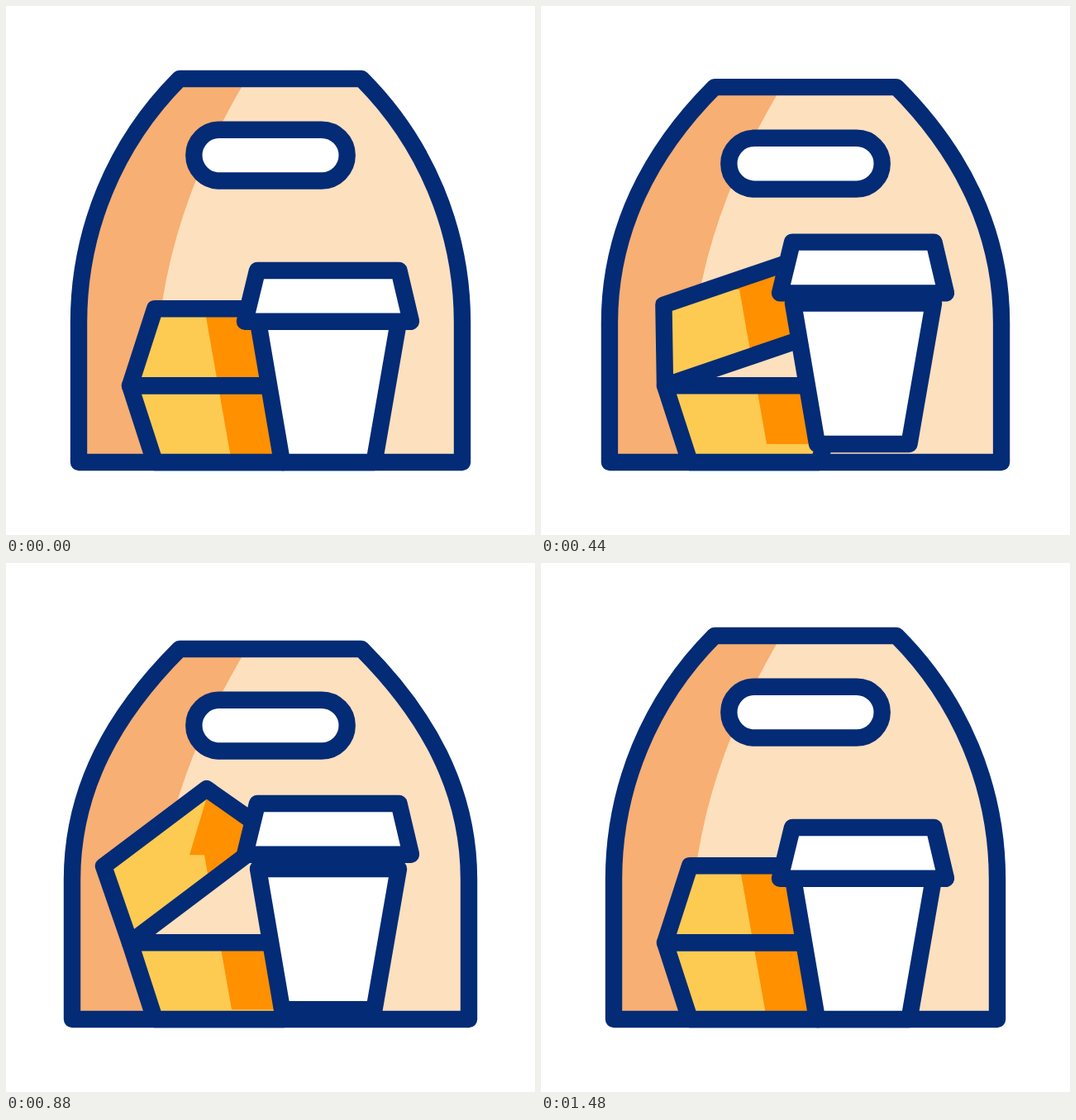
Write an HTML page that moves like this. It is 640 px wide and 640 px high and loops after 1.56 s.

```html
<!DOCTYPE html>
<html lang="en">
<head>
<meta charset="utf-8">
<title>Takeaway bag</title>
<style>
  html, body { margin: 0; width: 100%; height: 100%; overflow: hidden; background: #fff; }
  svg { display: block; width: 100%; height: 100%; }
  .line { fill: none; stroke: #032b76; stroke-width: 20.4; stroke-linejoin: round; stroke-linecap: round; }
  .white { fill: #fff; }
  .paper { fill: #fde0be; }
  .fold { fill: #f7af73; }
  .carton { fill: #fdcb52; }
  .shade { fill: #ff9000; }
</style>
</head>
<body>
<svg viewBox="0 0 640 640">
  <defs>
    <clipPath id="bagClip"><path class="bagShape"/></clipPath>
    <clipPath id="baseClip"><path d="M150 459.3H366L336 552H180Z"/></clipPath>
    <clipPath id="flapClip"><path class="flapShape"/></clipPath>
    <path id="shadow" d="M246 285H420V552H273L240 365H222Z"/>
  </defs>

  <path class="bagShape paper"/>
  <g clip-path="url(#bagClip)"><path id="fold" class="fold"/></g>
  <path class="bagShape line"/>
  <rect id="handle" class="line" style="fill:#fff" x="227.3" y="149.7" width="185.4" height="61.8" rx="30.9"/>

  <path class="carton" d="M150 459.3H366L336 552H180Z"/>
  <g clip-path="url(#baseClip)"><use class="shade cast" href="#shadow"/></g>
  <path class="line" d="M150 459.3H366L336 552H180Z"/>

  <path class="flapShape carton"/>
  <g clip-path="url(#flapClip)"><use class="shade cast" href="#shadow"/></g>
  <path class="flapShape line"/>

  <path id="cup" class="line" style="fill:#fff" d="M305 381.7H475L445.5 552H334Z"/>
  <path id="lid" class="line" style="fill:#fff" d="M304 320H475.5L490 381.7H289Z"/>
</svg>
<script>
const LOOP = 1560, STEP = 40, END = 1480;
const $ = id => document.getElementById(id);
const each = (name, key, value) =>
  document.querySelectorAll('.' + name).forEach(el => el.setAttribute(key, value));

const part = (t, a, b) => Math.min(1, Math.max(0, (t - a) / (b - a)));
const smooth = x => x * x * (3 - 2 * x);

// Each hop: start, top, landing, height
const lidHops = [[0, 260, 520, 66], [520, 760, 1000, 38.7], [1000, 1240, 1480, 21.6]];
const cupHops = [[0, 260, 520, 42.3], [520, 760, 1000, 15.7], [1000, 1080, 1480, 7]];

function height(hops, t) {
  for (const [a, top, b, h] of hops) {
    if (t < a || t >= b) continue;
    const x = (t - top) / (t < top ? top - a : b - top);
    return h * (1 - x * x);
  }
  return 0;
}

function bagPath(p) {
  const y = 88 + 16 * p, l = 88 - 8 * p, r = 640 - l;
  return `M210 ${y}H430C508.3 ${y + 78.3} ${r} 272 ${r} 383V552H${l}V383C${l} 272 131.7 ${y + 78.3} 210 ${y}Z`;
}

function foldPath(p) {
  const d = 16 * p;
  return `M60 ${88 + d}H291Q182 ${270 + d} 182 450V560H60Z`;
}

// Carton top, turned about its left hinge
function flapPath(deg) {
  const a = deg * Math.PI / 180, c = Math.cos(a), s = Math.sin(a);
  const pts = [[0, 0], [30, -93], [186, -93], [216, 0]]
    .map(([x, y]) => [150 + x * c + y * s, 459.3 + y * c - x * s].map(v => v.toFixed(2)).join(' '));
  return 'M' + pts.join('L') + 'Z';
}

function draw(t) {
  const squash = smooth(part(t, 180, 622)) - smooth(part(t, 900, 1332));
  const open = 37.6 * (smooth(part(t, 200, 680)) - part(t, 800, 1420) ** 2);
  const cupUp = `translate(0 ${-height(cupHops, t)})`;

  each('bagShape', 'd', bagPath(squash));
  $('fold').setAttribute('d', foldPath(squash));
  $('handle').setAttribute('transform', `translate(0 ${16 * squash})`);
  each('flapShape', 'd', flapPath(open));
  each('cast', 'transform', cupUp);
  $('cup').setAttribute('transform', cupUp);
  $('lid').setAttribute('transform', `translate(0 ${-height(lidHops, t)})`);
}

const start = performance.now();
function tick() {
  const t = (performance.now() - start) % LOOP;
  draw(Math.min(END, Math.floor(t / STEP) * STEP));
  requestAnimationFrame(tick);
}
tick();
</script>
</body>
</html>
```
